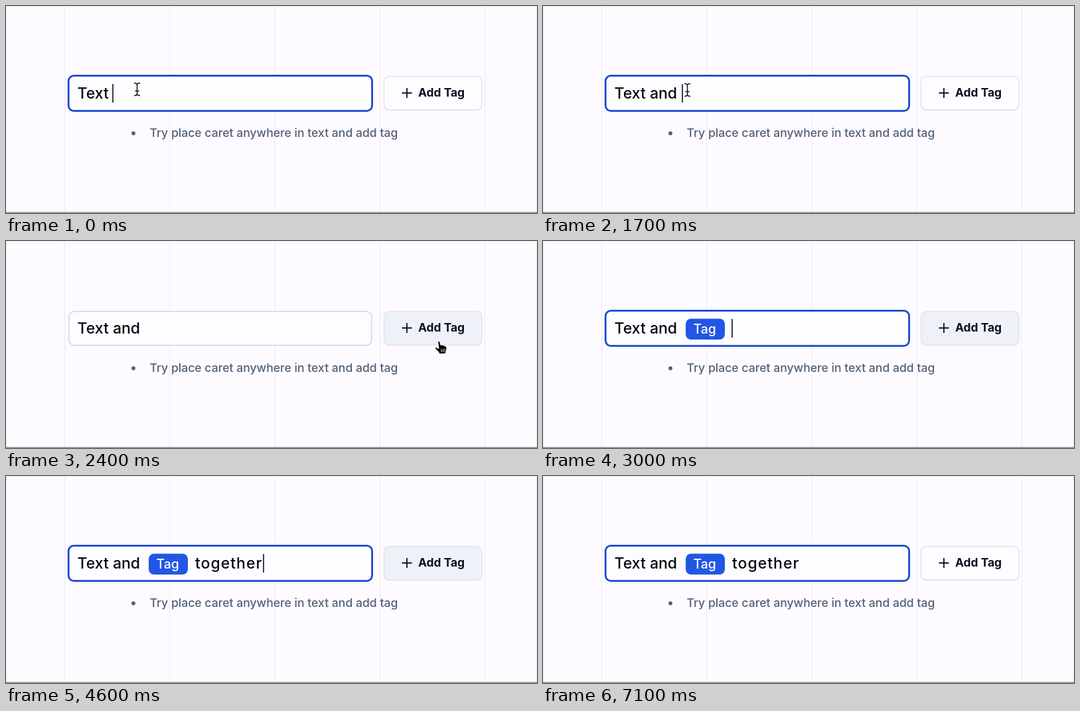
Recreate the animation shown at these times as an HTML page. Size 800 by 313 pixels, loop 7200 ms.

```html
<!DOCTYPE html>
<html lang="en">
<head>
<meta charset="utf-8">
<title>Text and tags</title>
<style>
  html, body { margin: 0; width: 100%; height: 100%; overflow: hidden; background: #fdfbff; }
  svg { display: block; width: 800px; height: 313px; }
  text { font-family: Inter, "Open Sans", sans-serif; white-space: pre; }
  .grid { stroke: #ebeaef; stroke-width: 1; fill: none; }
  .input { font-size: 23px; font-weight: 450; fill: #05070f; }
  .after { letter-spacing: 1px; }
  .hint { font-size: 17.6px; font-weight: 500; fill: #526079; }
  .label { font-size: 17.4px; font-weight: 700; fill: #0b0f1f; }
  .tag-text { font-size: 19.4px; font-weight: 500; fill: #fff; }
  .field { fill: #fdfcff; stroke: #cad5e1; stroke-width: 1.4; }
  .focus .field { stroke: #1a49d0; stroke-width: 2.8; }
  .button { fill: #fdfcff; stroke: #dfe5ed; stroke-width: 1.4; }
  .hover .button { fill: #eef1f8; }
  .pointer { fill: #000; stroke: #fff; stroke-linejoin: round; }
</style>
</head>
<body>
<svg id="stage" viewBox="0 0 800 313">
  <rect width="800" height="313" fill="#fdfbff"/>
  <path class="grid" d="M.5 0V312M88.5 0V312M246.5 0V312M405 0V312M563.5 0V312M721.5 0V312M799.5 0V312M0 .5H800"/>
  <path d="M0 312.3H800" stroke="#92938f" stroke-width="1.4"/>

  <rect class="field" id="field" rx="8"/>
  <text class="input" id="before" x="107.5" y="139.5"></text>
  <g id="tag">
    <rect x="215" y="117.5" width="59" height="31.5" rx="8" fill="#2157e4"/>
    <text class="tag-text" x="226.5" y="140">Tag</text>
  </g>
  <text class="input after" id="after" x="285" y="139.5"></text>
  <rect id="caret" y="118" width="1.6" height="28" fill="#0b1020"/>

  <rect x="569" y="108" width="148.5" height="50.5" rx="8" fill="#e3e6ec" opacity=".7"/>
  <rect class="button" x="569.5" y="106.5" width="147.5" height="50.5" rx="8"/>
  <path d="M596.5 131.5H611.5M604 124V139" stroke="#0b0f1f" stroke-width="1.8"/>
  <text class="label" x="621" y="137">Add Tag</text>

  <circle cx="192" cy="192.5" r="2.9" fill="#526079"/>
  <text class="hint" x="216.5" y="198">Try place caret anywhere in text and add tag</text>

  <g id="beam" fill="none" stroke-linecap="round">
    <path stroke="#fff" stroke-width="3.6" d="M-4-9.5Q0-9.5 0-6.5Q0-9.5 4-9.5M0-6.5V6.5M-4 9.5Q0 9.5 0 6.5Q0 9.5 4 9.5M-2.5 2.5H2.5"/>
    <path stroke="#111" stroke-width="1.5" d="M-4-9.5Q0-9.5 0-6.5Q0-9.5 4-9.5M0-6.5V6.5M-4 9.5Q0 9.5 0 6.5Q0 9.5 4 9.5M-2.5 2.5H2.5"/>
  </g>
  <g id="hand" class="pointer" stroke-width="1.3">
    <path d="M-4.5-8.5C-3.7-10-1.9-9.8-1.3-8.2L.3-3.2C1.2-4.4 3-4 3.5-2.7C4.8-3.5 6-2.8 6.4-1.6C8-2 8.8-.9 9 .5C9.4 4 8.5 6 7.2 10L-1.6 10.5C-3 7.5-5.8 5.3-8.2 2.6C-9.5 1-7.5-.7-5.8.3L-3.2 2Z"/>
    <path fill="none" stroke-width=".9" d="M.5 3L1.2 7.5M3.2 2.7L3.7 7.3M5.8 2.5L6 7"/>
  </g>
  <path id="arrow" class="pointer" stroke-width="1.3" d="M-5-9V7L-1.3 3.5L1.2 9.2L4 8L1.6 2.5H6.5Z"/>
</svg>
<script>
  const LOOP = 7200, STEP = 100;
  const BEFORE = "Text and", AFTER = "together";
  const $ = id => document.getElementById(id);

  // [start, letters before the tag, letters after it, caret x]
  const typing = [
    [0, 4, 0, 161], [700, 6, 0, 174], [900, 7, 0, 189], [1000, 8, 0, 204],
    [1300, 8, 0, 210], [2500, 8, 0, 279], [2900, 8, 0, 285],
    [3700, 8, 1, 294], [3800, 8, 2, 309], [3900, 8, 3, 324], [4000, 8, 4, 339],
    [4300, 8, 5, 348], [4400, 8, 6, 362], [4500, 8, 7, 377], [4600, 8, 8, 388]
  ];

  // [start, shape, x, y]
  const pointer = [
    [0, "beam", 197.5, 126], [300, "beam", 198, 126.5], [400, "beam", 199, 127],
    [700, ""], [1400, "beam", 203, 127], [1500, "beam", 210, 127],
    [1600, "beam", 215, 127], [1700, "beam", 217.5, 127], [1800, "beam", 285, 131],
    [1900, "beam", 420, 141], [2000, "beam", 547, 150], [2100, "hand", 620, 157],
    [2200, "hand", 651, 160], [2300, "hand", 655, 160.5], [2900, ""],
    [5400, "hand", 668, 148], [5500, "arrow", 708, 98], [5600, "arrow", 757, 43], [5700, ""]
  ];

  const caretOff = [[100, 600], [1800, 2500], [3400, 3700], [5100, 5600], [6100, 6600], [7100, LOOP]];

  const within = (t, from, to) => t >= from && t < to;
  const latest = (rows, t) => rows.filter(row => row[0] <= t).pop();
  const show = (id, on) => $(id).setAttribute("visibility", on ? "visible" : "hidden");

  function setField(focused) {
    const box = focused
      ? { x: 94.2, y: 105.4, width: 457.4, height: 53.2 }
      : { x: 94.8, y: 106.5, width: 456, height: 51.2 };
    for (const key in box) $("field").setAttribute(key, box[key]);
    $("stage").classList.toggle("focus", focused);
  }

  function render(t) {
    const [, before, after, caretX] = latest(typing, t);
    $("before").textContent = BEFORE.slice(0, before);
    $("after").textContent = AFTER.slice(0, after);
    $("caret").setAttribute("x", caretX - 0.8);
    show("caret", !caretOff.some(([from, to]) => within(t, from, to)));
    show("tag", t >= 2500);
    setField(!within(t, 2300, 2500));
    $("stage").classList.toggle("hover", within(t, 2100, 5500));

    const [, shape, x, y] = latest(pointer, t);
    for (const id of ["beam", "hand", "arrow"]) show(id, id === shape);
    if (shape) $(shape).setAttribute("transform", `translate(${x} ${y})`);
  }

  const start = performance.now();
  function tick() {
    const t = (performance.now() - start) % LOOP;
    render(Math.floor(t / STEP) * STEP);
    requestAnimationFrame(tick);
  }
  tick();
</script>
</body>
</html>
```
